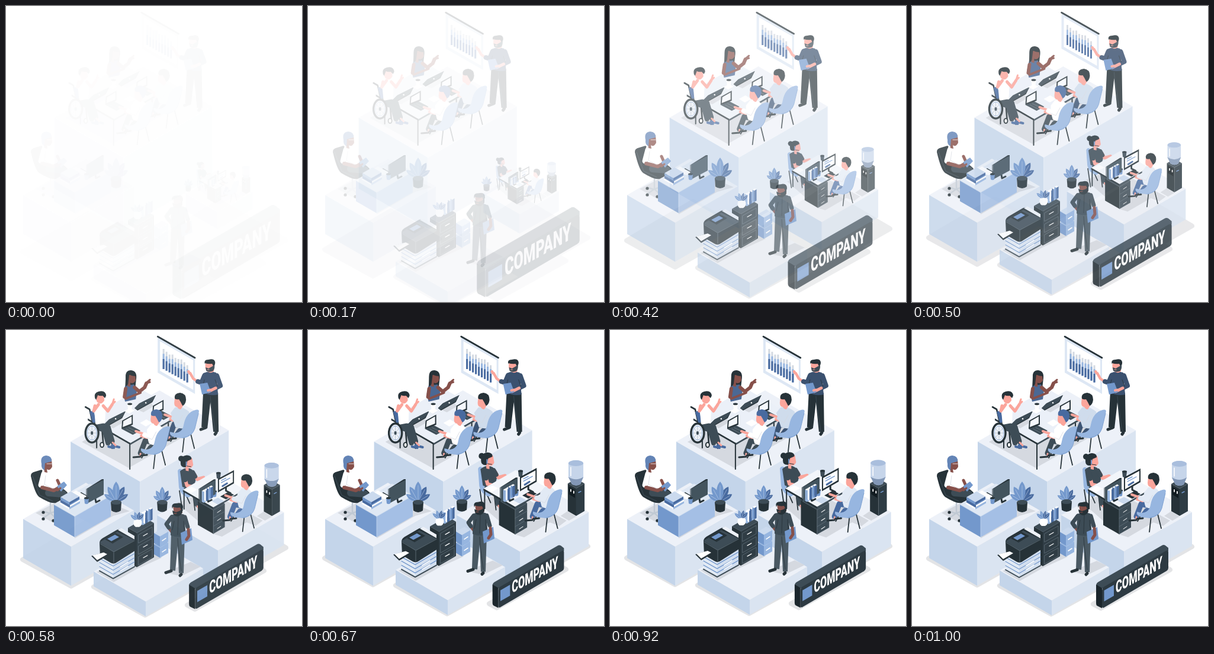
Recreate the animation shown at these times as an HTML page. Size 500x500 px, loop 1.04 s.

```html
<!DOCTYPE html>
<html lang="en">
<head>
<meta charset="utf-8">
<title>Isometric office</title>
<style>
html, body { margin: 0; width: 100%; height: 100%; overflow: hidden; background: #fff }
svg { display: block; width: 100vw; height: 100vh }
text { font: 900 28px Roboto, Arial, sans-serif; fill: #fff }
</style>
</head>
<body>
<svg id="stage" viewBox="0 0 500 500"></svg>
<script>
const ink = '#263238', grey = '#3d4c56', pale = '#cbdaee', blue = '#97b6e0', mid = '#7398cc',
  navy = '#486a9f', white = '#fff', off = '#edf1f8', shade = '#d5d9e0', skin = '#fba59b', brown = '#86504a';

const fill = (c, d) => `<path d="${d}" fill="${c}"/>`;
const line = (c, w, d, cap = 'round') => `<path d="${d}" fill="none" stroke="${c}" stroke-width="${w}" stroke-linecap="${cap}" stroke-linejoin="round"/>`;
const oval = (c, x, y, rx, ry = rx) => `<ellipse cx="${x}" cy="${y}" rx="${rx}" ry="${ry}" fill="${c}"/>`;
const move = (x, y, art) => `<g transform="translate(${x} ${y})">${art}</g>`;

// Isometric block whose front top corner is at x, y
function box(x, y, l, r, h, top, left, right) {
  const a = l * .577, b = r * .577;
  return fill(top, `M${x} ${y}l${-l} ${-a} ${r} ${-b} ${l} ${a}z`) +
    fill(left, `M${x} ${y}v${h}l${-l} ${-a}v${-h}z`) +
    fill(right, `M${x} ${y}v${h}l${r} ${-b}v${-h}z`);
}
const platform = (x, y, l, r, h) => box(x, y, l, r, h, off, '#c4d5ea', '#dae4f1');

const leaf = (c, angle, len) => `<g transform="rotate(${angle})">` +
  fill(c, `M0 0Q${-len * .34} ${-len * .6} 0 ${-len}Q${len * .34} ${-len * .6} 0 0`) + line(pale, .5, `M0 0V${-len * .8}`) + '</g>';
const plant = (x, y, c, dark, spread, len) => move(x, y,
  [-1, 1, -.5, .5, 0].map((k, i) => leaf(i % 2 ? dark : c, k * spread, len * (1 - .3 * Math.abs(k)))).join('') +
  fill(ink, 'M-9 1Q0 -4 9 1L8 15Q0 21 -8 15Z') + oval(grey, 0, 1, 9, 4));

const chair = line(ink, 1.8, 'M254 207L251 234M265 204L271 228M236 207L231 216') +
  fill(blue, 'M278 169Q281 161 273 163Q257 167 253 188Q251 201 238 202L230 200Q228 206 237 209L252 211Q268 208 272 194Z') +
  line(mid, .8, 'M278 169L272 194Q268 207 252 210');

// Person seated with the back to the viewer; lean shifts the upper body
const sitter = (x, y, shirt, hair, pants, lean = 0) => move(x, y,
  line(pants, 9, 'M261 192L237 187L229 208') + line(pants, 8, 'M259 196L246 198L240 206') +
  line(skin, 3, 'M229 209V213') + line(ink, 3, 'M229 214L217 215M240 211L230 212') +
  line(skin, 4, 'M238 177L221 171M240 182L230 179') +
  fill(shirt, `M${250 + lean} 159Q${261 + lean} 155 ${268 + lean / 2} 166L269 192Q256 198 ${245 + lean / 2} 192Q${241 + lean / 2} 180 ${243 + lean} 168Z`) +
  line(shirt, 8, `M${253 + lean / 2} 169L${247 + lean / 2} 181L236 177`) + line(shade, .8, `M${257 + lean / 2} 172L${250 + lean / 2} 185L239 181`) +
  move(lean, 0, fill(skin, 'M250 142Q256 137 264 143V156L260 162Q256 162 254 158Q249 158 249 151Z') +
    fill(hair, 'M250 144Q248 135 259 134Q269 135 269 146Q268 154 263 156L260 150L257 145Q253 146 250 144Z')) + chair);

const openLaptop = (x, y) => move(x, y, fill(grey, 'M0 24L13 17L32 27L19 34Z') +
  fill(ink, 'M0 24L1 10L19 0L19 17Z') + fill('#f5f8fd', 'M2 21L3 11L17 3L17 15Z') + line('#71808a', .8, 'M8 24L21 31M12 22L25 28'));
const backLaptop = (x, y) => move(x, y, fill(shade, 'M1 15L15 21L32 11L28 5Z') +
  fill(ink, 'M0 14L8 6L36 -8L30 4L5 18Z') + fill(grey, 'M0 14L8 6L36 -8L29 3L4 17Z') + oval(white, 19, 5, 1.3));
const cup = (x, y, c) => fill(c, `M${x - 4} ${y}h8l-1 9q-3 2 -6 0z`) + oval(ink, x, y, 4, 1.8);
const books = (x, y) => move(x, y, [blue, white, navy, mid].map((c, i) =>
  box(i * 4.2, -i * 2.4, 3, 4, 19, white, c, i % 2 ? navy : blue)).join(''));

const shadow = `<g fill="#e3e4e6" stroke="#e3e4e6" stroke-width="8" stroke-linejoin="round"><path d="M28 386L110 431L222 368L140 320ZM148 432L235 480L338 423L250 370ZM250 370L360 430L473 366L360 300ZM306 463L319 470L436 405L424 398Z"/></g>`;

const heights = [34, 32, 30, 33, 30, 31, 33, 31, 29];
const bars = (c, part) => line(c, 3, heights.map((h, i) => `M${268 + i * 5} ${66 + i * 2.8}v${-h * part}`).join(''), 'butt');

const screen = fill('#dde7f4', 'M258 12L321 48V108L258 72Z') + fill(white, 'M262 19L318 51V101L262 69Z') +
  bars('#d3d9e1', 1) + bars(blue, .76) + bars(navy, .5) + line(ink, 2.6, 'M258 11L321 47');

const presenter = fill(ink, 'M335 103L360 106L361 172L352 172L347 122L342 166L332 164Z') +
  line(grey, .8, 'M347 112L348 124L355 170') +
  line(ink, 5, 'M339 165L331 168M357 173L355 176') +
  line(skin, 4.5, 'M328 89L318 82L313 73M312 73L310 70') +
  fill('#3b516f', 'M335 73Q345 68 357 72L360 109Q347 112 335 106Z') +
  line('#3b516f', 8, 'M337 77L332 89L326 87M358 77L364 94L358 97') +
  line(ink, .8, 'M337 84L335 92M355 84L359 95') +
  line(skin, 5, 'M356 98L344 104') + fill(mid, 'M329 91L342 89L348 105L333 109Z') + line(skin, 4, 'M348 101L343 102') +
  fill(skin, 'M339 54H354L353 70Q346 75 341 69Q337 66 339 54Z') +
  fill(ink, 'M338 58Q335 50 344 50Q356 47 355 57L353 63L350 57Q344 58 338 56Z') +
  fill(grey, 'M339 63L344 65L351 61L354 58Q355 68 350 70Q344 72 340 69Z') + line(skin, 1.2, 'M342 67H345');

const talker = fill(ink, 'M204 80Q203 68 213 68Q223 69 222 81L220 99L203 99Z') +
  fill('#4b6894', 'M203 94L218 92L223 102L221 117L203 121L200 108Z') +
  line(brown, 6, 'M204 99L202 113M219 97L227 104L236 97L239 90') + line(brown, 3, 'M239 89L245 84M239 90L245 88') +
  line(brown, 4, 'M204 116L219 110L229 106') +
  fill(brown, 'M208 76L220 75L221 85Q217 92 212 89L212 96L207 95Z') +
  fill(ink, 'M204 83Q203 70 213 69Q221 69 221 78Q214 78 210 75L208 91L204 96Z');

const wheelchair = line(ink, 2.6, 'M136 130L143 134L149 160L164 166L166 191') +
  fill(navy, 'M143 138L150 136L156 162L151 166Z') +
  line(grey, 9, 'M155 159L174 164L181 188') + line(grey, 8, 'M158 166L168 169L174 191') +
  line(navy, 4, 'M181 195L193 198M175 197L184 199') + line(skin, 3, 'M182 190L187 195') +
  fill(white, 'M150 126L165 122L170 135L169 157L153 160Z') +
  line(skin, 5, 'M166 128L174 137L181 126M152 128L150 137L158 126') + line(skin, 3, 'M181 126L184 117M182 125L186 121') +
  fill(skin, 'M154 110L167 109L168 119Q163 127 158 123Q153 122 154 110Z') +
  fill(ink, 'M152 115Q150 106 158 104Q170 101 171 111L169 115L165 111Q160 112 157 110L154 118Z') +
  `<g fill="none"><ellipse cx="147" cy="174" rx="11" ry="16" fill="#eef2f8" stroke="${ink}" stroke-width="3.4"/><ellipse cx="147" cy="174" rx="8" ry="12" stroke="${blue}"/></g>` +
  line('#9eacbb', .6, 'M147 162V186M139 174H155M141 166L153 182M153 166L141 182') + oval(grey, 147, 174, 2, 3) +
  `<ellipse cx="164" cy="194" rx="3" ry="4" fill="${white}" stroke="${ink}" stroke-width="2"/>`;

const meeting = platform(228, 256, 117, 150, 120) +
  fill(shade, 'M130 189L209 233L320 170L240 126Z') + screen + presenter +
  line(ink, 2, 'M155 162V199M181 176V200M211 190V235M276 153V185') +
  box(212, 191, 72, 88, 3, '#ebf0f8', ink, grey) + talker +
  backLaptop(168, 145) + backLaptop(219, 118) + openLaptop(197, 143) + openLaptop(249, 118) +
  fill(white, 'M228 157L239 151L249 157L238 163Z') + fill(white, 'M202 137L211 132L219 136L210 141Z') +
  cup(211, 125, white) + wheelchair +
  sitter(49, -28, '#cfdcec', ink, '#3c5474', -12) + sitter(0, 0, white, navy, grey, -3);

const manager = fill(shade, 'M50 309L86 329L116 311L85 291Z') +
  line('#c0c9d3', 2.4, 'M75 288V310L65 307M75 309L84 318M75 309L64 317M75 309L86 306') +
  [[63, 308], [63, 319], [80, 322], [87, 308]].map(([x, y]) => oval(ink, x, y, 2.6)).join('') +
  fill(ink, 'M42 247Q41 241 50 239L60 236Q67 241 68 264L94 267Q106 273 105 281L84 292Q75 294 56 282Q49 277 42 247Z') +
  line(grey, 1, 'M45 247L57 279L79 289') + line(grey, 12, 'M72 275L96 277') +
  fill(white, 'M61 238Q72 231 84 239L91 263Q79 275 64 268Z') +
  line(white, 9, 'M64 243L59 262') + line(brown, 6, 'M61 266L81 271L90 266') + line(brown, 5, 'M87 254L91 263') +
  line(shade, .8, 'M67 246L65 261L79 268') +
  fill(brown, 'M63 221L77 218L78 231Q74 239 69 235L70 241L65 240Z') +
  fill('#6384b6', 'M60 226Q57 213 68 212Q78 213 77 222L66 225L65 237Q59 234 60 226Z') +
  line(white, .8, 'M69 226H77') + fill(mid, 'M86 264L98 256L103 262L93 273Z') + line(brown, 3, 'M87 271L92 267');

const monitor = (x, y) => move(x, y, line(ink, 3, 'M12 25L14 36L20 33') +
  fill(ink, 'M-3 14L0 13L27 -1V-3L24 -3Z') + fill('#43545e', 'M-1 13L27 -2V23L-1 38Z') + line(ink, 1, 'M-2 14V37'));

const reception = platform(110, 366, 81, 106, 66) + manager +
  fill(shade, 'M116 352L181 314L209 306L185 296L118 334Z') +
  box(116, 315, 35, 61, 35, '#dfe8f4', mid, '#a4bfe5') + line(pale, .7, 'M81 295L116 315V350M116 315L177 280') +
  fill(ink, 'M122 277L127 274L139 281L134 284Z') + fill(white, 'M110 276L118 271L137 281L129 286Z') + monitor(138, 255) +
  box(107, 300, 16, 18, 3, navy, white, blue) + box(108, 296, 16, 17, 3, mid, navy, white) + box(107, 291, 15, 17, 4, pale, mid, navy) +
  cup(136, 284, mid) + plant(186, 290, mid, navy, 58, 34);

const agent = line(ink, 1.8, 'M291 270L296 304M315 279L318 304M301 274L309 292') +
  fill(blue, 'M288 235Q291 229 296 234L301 268L319 273L307 282Q293 278 290 264Z') +
  line(grey, 9, 'M303 268L318 277L322 294') + line(skin, 3, 'M322 297L326 303') + line(ink, 3, 'M326 304L330 306') +
  fill(grey, 'M292 236Q302 227 313 233L320 249L316 263Q305 269 296 263Z') +
  line(skin, 6, 'M317 241L322 250L333 247M301 250L304 261L318 264') + line(grey, 8, 'M299 241L301 251M314 238L318 245') +
  fill(skin, 'M300 215L313 213L315 225Q311 233 307 229L307 236L302 235Z') +
  oval(ink, 294, 214, 5) + fill(ink, 'M293 222Q292 209 304 208Q313 209 312 215L305 218L302 229Q293 230 293 222Z') +
  line(mid, 2, 'M303 220V226') + line(ink, 1, 'M304 227L311 228');

const support = platform(358, 374, 106, 115, 57) +
  fill(shade, 'M287 291L349 345L365 350L408 325L424 331L436 322L340 270Z') +
  plant(261, 289, mid, navy, 58, 26) + agent +
  line(ink, 2, 'M299 270V302M400 268V301') +
  box(350, 304, 27, 20, 41, grey, ink, grey) + line('#62717b', .8, 'M350 318L370 306M350 332L370 320M350 304V345') +
  line(white, 1, 'M357 308L363 304M357 322L363 318M357 336L363 332') +
  box(350, 299, 53, 54, 3, '#f2f5fa', ink, grey) +
  fill(white, 'M301 269L312 263L322 268L311 274Z') + fill(pale, 'M347 288L358 282L369 288L358 294Z') +
  cup(359, 239, grey) + cup(352, 271, mid) + monitor(327, 253) + books(333, 272) +
  line(ink, 3, 'M372 260V270L380 274') + fill(ink, 'M358 249L386 234V257L358 273Z') + fill(white, 'M360 251L384 238V255L360 269Z') +
  line(mid, 1.4, 'M364 252L372 248M364 256L379 248') + line(navy, 3, 'M366 262L374 257') +
  fill(ink, 'M362 280L376 272L386 277L372 285Z') +
  fill(shade, 'M438 306L452 315L440 322L426 314Z') +
  box(452, 268, 14, 14, 46, grey, ink, '#2e3c44') + fill('#111b20', 'M440 265L450 271V284L440 278Z') +
  line(white, 1.8, 'M443 270V273M448 273V276') + line(mid, 1.5, 'M456 275L460 273') +
  fill('#c6d5ea', 'M439 226Q452 216 464 226V250L459 261Q452 265 445 261L439 250Z') +
  fill('#8297b6', 'M439 249Q452 257 464 249L459 261Q452 265 445 261Z') + oval('#a9bedd', 451.5, 226, 12.5, 5) + line(white, 1.5, 'M443 233V247') +
  sitter(150, 107, '#e2eaf5', ink, navy, -1);

const copier = box(181, 390, 23, 36, 28, white, '#e2eaf4', '#d3dfef') +
  line(mid, 1.2, 'M158 384L181 397L217 376M158 391L181 404L217 383M158 398L181 411L217 390') +
  line(grey, 2, 'M158 405L181 418L217 398') + line(white, 1.5, 'M193 398L206 390M193 405L206 397') +
  fill(ink, 'M158 358Q158 353 163 350L187 336Q191 334 195 336L214 347Q218 349 218 354V371L185 392Q180 394 176 391L159 381Z') +
  fill(grey, 'M158 357L188 339L217 353L182 373Z') + line('#65747e', .8, 'M159 359L182 373L217 354M182 374V391') +
  fill(ink, 'M167 352L185 341L198 348L180 359Z') + fill(mid, 'M171 351L184 344L191 348L178 355Z') +
  fill('#eef2f8', 'M189 336L195 333L217 346V352Z') +
  fill(ink, 'M144 380L168 373L174 378L154 390Z') + fill(white, 'M146 379L165 374L171 377L154 387Z');

const storage = box(260, 366, 10, 14, 17, blue, mid, blue) + box(260, 347, 10, 14, 17, pale, mid, blue) +
  line(white, 1.6, 'M264 354L270 350M264 373L270 369') +
  box(221, 341, 15, 29, 58, grey, ink, '#303d45') + line('#5f6e78', .8, 'M224 344L247 331V345L224 358ZM224 363L247 350V364L224 377ZM224 381L247 368V382L224 395Z') +
  line(white, 1.2, 'M232 346L239 342M232 365L239 361M232 383L239 379') + books(231, 309) +
  move(222, 320, [-50, 45, -18, 15].map((a, i) => leaf(i % 2 ? navy : mid, a, 15)).join('')) +
  fill(white, 'M216 320Q222 317 229 320Q231 328 225 331H219Q214 328 216 320Z');

const visitor = fill(shade, 'M268 408L296 414L329 398L312 390Z') +
  fill('#4a5963', 'M279 343L302 344L300 409L292 409L290 363L286 405L277 404Z') + line(ink, .8, 'M290 350L291 365L296 405') +
  line(ink, 5, 'M279 405L270 408M296 411L294 413') +
  line(brown, 5, 'M272 329L280 339') + fill(grey, 'M279 311Q290 306 301 310L304 346Q290 350 278 345Z') +
  line(grey, 7, 'M280 314L271 326L275 332M302 314L307 331') + line(ink, .8, 'M284 321L281 336M300 321L301 341M291 312L290 344') +
  fill(mid, 'M295 341L313 333L315 353L297 361Z') + line(brown, 5, 'M308 335L309 346L305 352') +
  fill(brown, 'M282 295H298V307Q292 314 284 309Z') +
  fill(ink, 'M281 300Q278 291 288 291Q299 288 299 298L297 304L294 298Q287 299 282 297Z') +
  fill(ink, 'M281 303L287 306L293 304L298 300Q299 309 293 312Q285 315 282 308Z') + line(brown, 1.2, 'M284 308H288');

const lobby = platform(236, 457, 88, 97, 25) + fill(shade, 'M153 407L182 424L221 402L263 383L245 371Z') + storage + copier + visitor;

const sign = fill(grey, 'M311 431Q311 428 314 426L422 364Q425 362 428 364L433 368V373L321 437Z') +
  fill('#1b262c', 'M311 430L321 436V470L313 466Q311 465 311 462Z') +
  fill('#2d3a42', 'M321 440Q321 436 324 434L429 373Q433 371 433 375V402Q433 405 430 407L324 469Q321 470 321 467Z') +
  fill(mid, 'M324.5 440L341 430.5V449L324.5 458.5Z') +
  '<text transform="matrix(.59 -.33 0 1 344 445)">COMPANY</text>';

const scaleAt = (x, y, k) => `translate(${x} ${y}) scale(${k}) translate(${-x} ${-y})`;
// Back to front: artwork and its transform while q runs from 1 to 0
const layers = [
  [shadow, q => `translate(0 ${30 * q})`],
  [meeting, q => `translate(${-30 * q} 0)`],
  [reception, () => ''],
  [support, q => scaleAt(357, 321, 1 - q / 2)],
  [lobby, q => `translate(0 ${30 * q})`],
  [sign, q => scaleAt(372, 418, 1 + q / 2)]
];
stage.innerHTML = layers.map(([art]) => `<g>${art}</g>`).join('');

const bezier = (a, b, s) => 3 * a * s * (1 - s) ** 2 + 3 * b * s * s * (1 - s) + s ** 3;
function ease(x) {
  let lo = 0, hi = 1;
  for (let i = 0; i < 24; i++) {
    const s = (lo + hi) / 2;
    if (bezier(.36, .5, s) < x) lo = s; else hi = s;
  }
  return bezier(-.01, 1.38, hi);
}

const start = performance.now();
function draw() {
  const time = (performance.now() - start) % 1040;
  const step = Math.max(1, Math.floor((time + 4) * .024)); // 24 steps a second
  const p = ease(Math.min(1, (step + .95) / 24));
  layers.forEach(([, place], i) => {
    const g = stage.children[i];
    g.setAttribute('transform', place(1 - p));
    g.setAttribute('opacity', Math.min(1, p));
  });
  requestAnimationFrame(draw);
}
draw();
</script>
</body>
</html>
```
